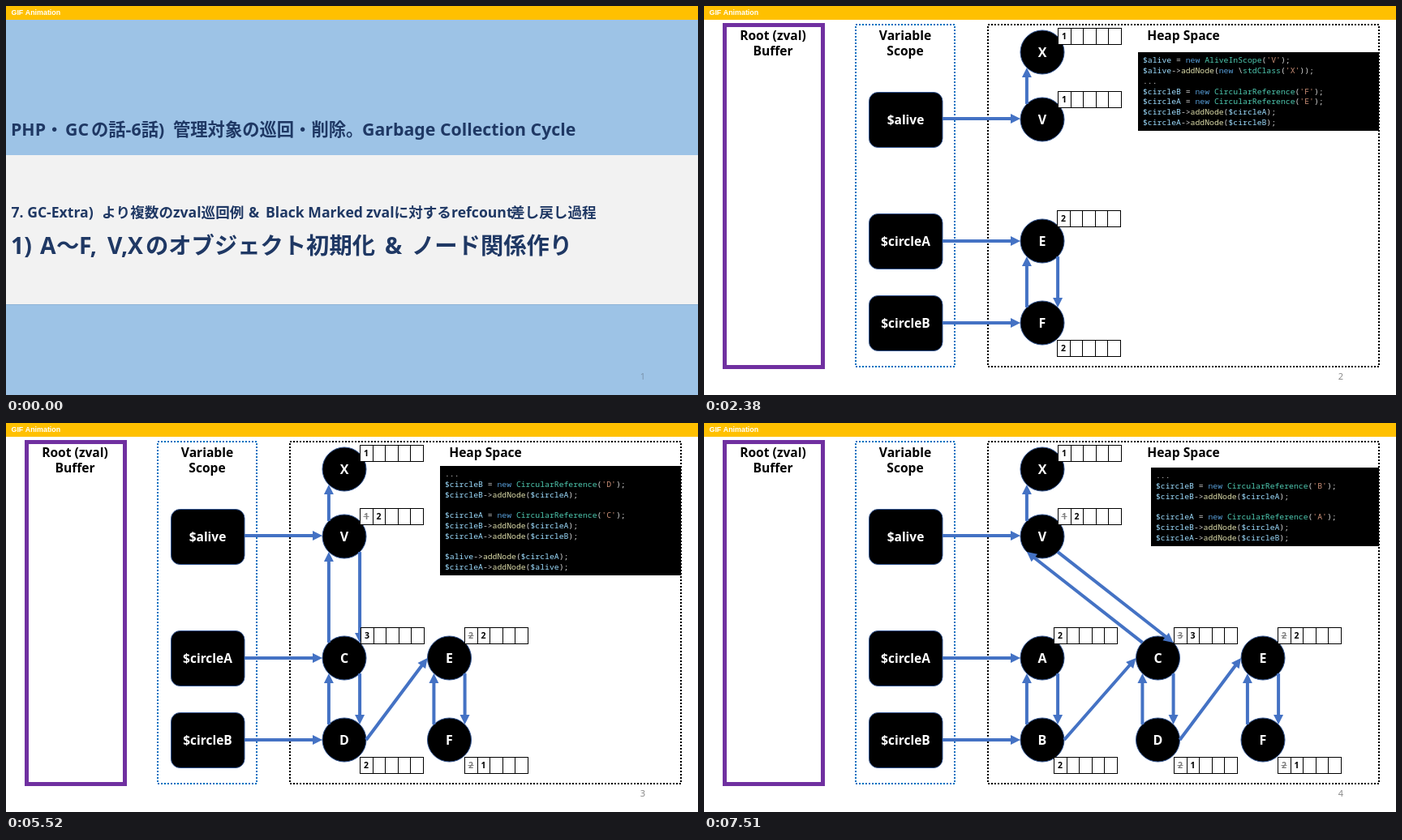
An HTML page with a canvas that plays this animation: 853x480 px, repeating every 8000 ms.

```html
<!DOCTYPE html>
<html lang="ja">
<head>
<meta charset="utf-8">
<title>GC cycle: object setup</title>
<style>
html, body { margin: 0; width: 100%; height: 100%; overflow: hidden; background: #fff; }
canvas { display: block; }
</style>
</head>
<body>
<canvas id="stage" width="853" height="480"></canvas>
<script>
const ctx = document.getElementById('stage').getContext('2d');
const LOOP = 8000;
const BLUE = '#4472c4';
const NAVY = '#1f3864';
const SANS = '"Noto Sans", "Noto Sans CJK JP", "Noto Sans CJK", sans-serif';
const MONO = '"Noto Sans Mono", "DejaVu Sans Mono", monospace';
const RADIUS = 27;
const D = RADIUS * Math.SQRT1_2;
const PORTS = { l: [-RADIUS, 0], r: [RADIUS, 0], tl: [-D, -D], tr: [D, -D], bl: [-D, D], br: [D, D] };

const COL = 417;
const ROW = { x: 57, v: 140, top: 290, low: 391 };

// nodes: name -> [x, y]; counters: [x, y, current, struck-out previous]
const slides = [
  {
    start: 500, page: 2,
    nodes: { X: [COL, ROW.x], V: [COL, ROW.v], E: [COL, ROW.top], F: [COL, ROW.low] },
    links: ['V.tl>X.bl', 'F.tl>E.bl', 'E.br>F.tr'],
    counters: [[436, 27, 1], [436, 105, 1], [435, 252, 2], [435, 412, 2]],
    code: { x: 535, y: 57, h: 97, lines: [
      "$alive = new AliveInScope('V');",
      "$alive->addNode(new \\stdClass('X'));",
      '...',
      "$circleB = new CircularReference('F');",
      "$circleA = new CircularReference('E');",
      '$circleB->addNode($circleA);',
      '$circleA->addNode($circleB);'] }
  },
  {
    start: 3640, page: 3,
    nodes: { X: [COL, ROW.x], V: [COL, ROW.v], C: [COL, ROW.top], D: [COL, ROW.low],
             E: [546.5, ROW.top], F: [546.5, ROW.low] },
    links: ['V.tl>X.bl', 'C.tl>V.bl', 'V.br>C.tr', 'D.tl>C.bl', 'C.br>D.tr',
            'D.r>E.l', 'F.tl>E.bl', 'E.br>F.tr'],
    counters: [[436, 27, 1], [436, 105, 2, 1], [437, 252, 3], [436, 412, 2],
               [565, 252, 2, 2], [565, 412, 1, 2]],
    code: { x: 535, y: 53, h: 135, lines: [
      '...',
      "$circleB = new CircularReference('D');",
      '$circleB->addNode($circleA);',
      '',
      "$circleA = new CircularReference('C');",
      '$circleB->addNode($circleA);',
      '$circleA->addNode($circleB);',
      '',
      '$alive->addNode($circleA);',
      '$circleA->addNode($alive);'] }
  },
  {
    start: 6780, page: 4,
    nodes: { X: [COL, ROW.x], V: [COL, ROW.v], A: [COL, ROW.top], B: [COL, ROW.low],
             C: [559.5, ROW.top], D: [559.5, ROW.low], E: [689, ROW.top], F: [689, ROW.low] },
    links: ['V.tl>X.bl', 'C.tl>V.bl', 'V.br>C.tr', 'B.tl>A.bl', 'A.br>B.tr', 'B.r>C.l',
            'D.tl>C.bl', 'C.br>D.tr', 'D.r>E.l', 'F.tl>E.bl', 'E.br>F.tr'],
    counters: [[436, 27, 1], [436, 105, 2, 1], [431, 252, 2], [431, 412, 2],
               [579, 252, 3, 3], [579, 412, 1, 2], [707, 252, 2, 2], [707, 412, 1, 2]],
    code: { x: 551, y: 55, h: 97, lines: [
      '...',
      "$circleB = new CircularReference('B');",
      '$circleB->addNode($circleA);',
      '',
      "$circleA = new CircularReference('A');",
      '$circleB->addNode($circleA);',
      '$circleA->addNode($circleB);'] }
  }
];

function rect(x, y, w, h, color) {
  ctx.fillStyle = color;
  ctx.fillRect(x, y, w, h);
}

function text(str, x, y, font, color, align = 'left') {
  ctx.font = font;
  ctx.fillStyle = color;
  ctx.textAlign = align;
  ctx.fillText(str, x, y);
}

function frameRect(x, y, w, h, color, width, dash = []) {
  ctx.strokeStyle = color;
  ctx.lineWidth = width;
  ctx.setLineDash(dash);
  ctx.strokeRect(x, y, w, h);
  ctx.setLineDash([]);
}

function line(x1, y1, x2, y2, color, width) {
  ctx.strokeStyle = color;
  ctx.lineWidth = width;
  ctx.beginPath();
  ctx.moveTo(x1, y1);
  ctx.lineTo(x2, y2);
  ctx.stroke();
}

function arrow(x1, y1, x2, y2) {
  const length = Math.hypot(x2 - x1, y2 - y1);
  ctx.save();
  ctx.translate(x1, y1);
  ctx.rotate(Math.atan2(y2 - y1, x2 - x1));
  line(0, 0, length - 10, 0, BLUE, 4);
  ctx.fillStyle = BLUE;
  ctx.beginPath();
  ctx.moveTo(length, 0);
  ctx.lineTo(length - 12, -6);
  ctx.lineTo(length - 12, 6);
  ctx.fill();
  ctx.restore();
}

function shape(path) {
  ctx.beginPath();
  path();
  ctx.fillStyle = '#000';
  ctx.fill();
  ctx.strokeStyle = '#2f528f';
  ctx.lineWidth = 1;
  ctx.stroke();
}

function node(name, [x, y]) {
  shape(() => ctx.arc(x, y, RADIUS, 0, Math.PI * 2));
  text(name, x, y + 6, `700 16px ${SANS}`, '#fff', 'center');
}

function variable(name, y, arrowY) {
  shape(() => ctx.roundRect(203.5, y - 34, 90.5, 68, 11));
  text(name, 248.5, y + 5.5, `700 15.5px ${SANS}`, '#fff', 'center');
  arrow(294, arrowY, 390, arrowY);
}

function link(nodes, spec) {
  const [from, to] = spec.split('>').map(end => {
    const [name, port] = end.split('.');
    return nodes[name].map((v, i) => v + PORTS[port][i]);
  });
  arrow(...from, ...to);
}

function counter(x, y, value, old) {
  const cell = 15.6;
  rect(x, y, cell * 5, 20, '#fff');
  frameRect(x + 0.5, y + 0.5, cell * 5, 20, '#000', 1);
  for (let i = 1; i < 5; i++) {
    const edge = Math.round(x + i * cell) + 0.5;
    line(edge, y, edge, y + 20, '#000', 1);
  }
  const font = `700 10.5px ${SANS}`;
  const put = (v, i, color) => text(v, x + 8 + i * cell, y + 14, font, color, 'center');
  if (old) {
    put(old, 0, '#7f7f7f');
    line(x + 4.5, y + 10.5, x + 11.5, y + 10.5, '#7f7f7f', 1);
  }
  put(value, old ? 1 : 0, '#000');
}

function tokenColor(token) {
  if (token[0] === '$') return '#9cdcfe';
  if (token[0] === "'") return '#ce9178';
  if (token === 'new') return '#569cd6';
  if (token === 'addNode') return '#dcdcaa';
  if (/^\w/.test(token)) return '#4ec9b0';
  return '#d4d4d4';
}

function codeBox({ x, y, h, lines }) {
  rect(x, y, 832 - x, h, '#000');
  const font = `500 9.78px ${MONO}`;
  lines.forEach((row, i) => {
    let left = x + 6;
    for (const token of row.match(/\$\w+|'\w+'|\w+|[^\w$']+/g) || []) {
      text(token, left, y + 13.3 + i * 12.75, font, tokenColor(token));
      left += ctx.measureText(token).width;
    }
  });
}

function header() {
  rect(0, 0, 853, 17, '#ffc000');
  text('GIF Animation', 6.5, 11, '700 8.9px "Liberation Sans", Arial, sans-serif', '#fff');
}

function titleLine(size, y, parts) {
  for (const [x, str] of parts) text(str, x, y, `700 ${size}px ${SANS}`, NAVY);
}

function drawTitle() {
  rect(0, 0, 853, 480, '#9dc3e6');
  rect(0, 184, 853, 184, '#f2f2f2');
  rect(0, 368, 853, 1, '#8fb4d6');
  header();
  titleLine(21.3, 160, [[6, 'PHP・'], [73, 'GC'], [105, 'の話-6話)'],
    [206, '管理対象の巡回・削除。'], [439, 'Garbage Collection Cycle']]);
  titleLine(17.6, 261, [[6.5, '7. GC-Extra)'], [118, 'より複数のzval巡回例'], [299, '&'],
    [320, 'Black Marked'], [444, 'zvalに対する'], [549, 'refcount'], [622, '差し戻し過程']]);
  titleLine(28.3, 306, [[6, '1)'], [42, 'A'], [62, '～'], [90, 'F,'], [125, 'V,X'],
    [172, 'のオブジェクト初期化'], [467, '&'], [500, 'ノード関係作り']]);
  text('1', 785, 461, `11px ${SANS}`, '#7c94ad', 'center');
}

function drawSlide(slide) {
  rect(0, 0, 853, 480, '#fff');
  header();
  frameRect(25.5, 23.5, 121, 422, '#7030a0', 5);
  frameRect(187, 23, 122, 422, '#0070c0', 2, [2, 2]);
  frameRect(350, 23, 482, 422, '#000', 2, [2, 2]);

  const label = (str, x, y) => text(str, x, y, `700 15.6px ${SANS}`, '#000', 'center');
  label('Root (zval)', 85, 42);
  label('Buffer', 85, 61);
  label('Variable', 248, 42);
  label('Scope', 248, 61);
  label('Heap Space', 591, 42);

  variable('$alive', 140.5, 139);
  variable('$circleA', 290.5, 290);
  variable('$circleB', 391.5, 391);
  for (const name in slide.nodes) node(name, slide.nodes[name]);
  for (const spec of slide.links) link(slide.nodes, spec);
  for (const item of slide.counters) counter(...item);
  codeBox(slide.code);
  text(slide.page, 785, 461, `11px ${SANS}`, '#898989', 'center');
}

const began = performance.now();
function tick() {
  const time = (performance.now() - began) % LOOP;
  const slide = slides.filter(s => s.start <= time).pop();
  if (slide) drawSlide(slide);
  else drawTitle();
  requestAnimationFrame(tick);
}
tick();
</script>
</body>
</html>
```
